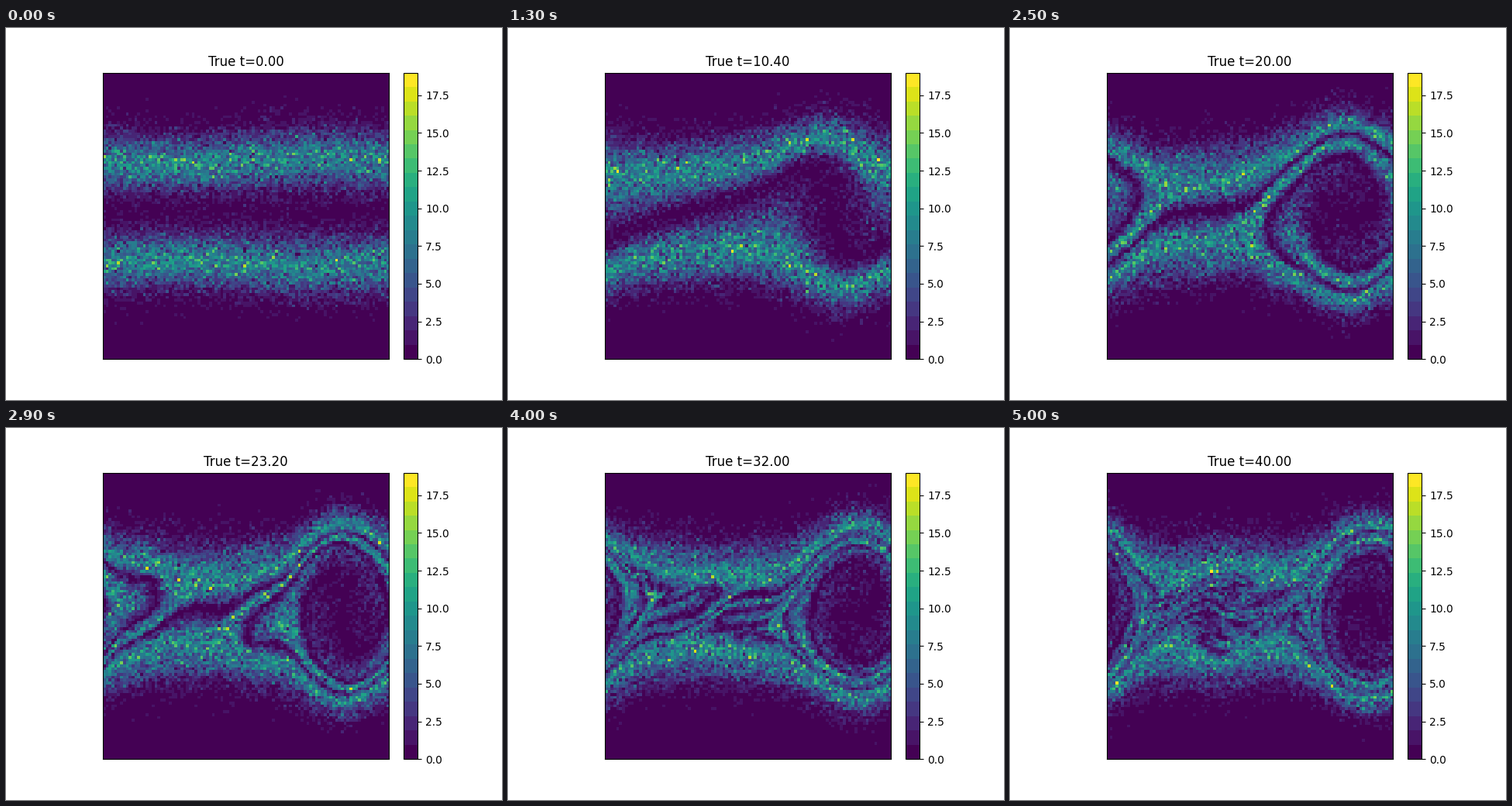
Write a matplotlib script that moves like this. It is 640 by 480 pixels and loops after 5100 ms.

```python
import numpy as np
import matplotlib.pyplot as plt
from matplotlib.animation import FuncAnimation

# Two-stream instability: electrostatic particle-in-cell run in 1D
FRAMES, FRAME_DT, SUBSTEPS = 51, 0.8, 4
LENGTH, GRID, COUNT = 50.0, 400, 25000
BEAM, DRIFT, SPREAD, KICK = 3.0, 0.22, 1.0, 0.06
V_MAX, BINS, TOP = 8.48, 100, 19

rng = np.random.default_rng(4)
wavenumber = 2 * np.pi * np.fft.rfftfreq(GRID, LENGTH / GRID)


def start():
    half = COUNT // 2
    slots = np.arange(half)
    x = np.concatenate([(slots + rng.random(half)) * LENGTH / half for _ in range(2)])
    v = rng.normal(0, SPREAD, COUNT)
    v += np.where(np.arange(COUNT) < half, BEAM, -BEAM)
    v *= 1 - KICK * np.sin(2 * np.pi * x / LENGTH)
    return x % LENGTH, v + DRIFT


def acceleration(x):
    cell = x * GRID / LENGTH
    left = cell.astype(int)
    frac = cell - left
    left %= GRID
    right = (left + 1) % GRID
    density = np.bincount(left, 1 - frac, GRID) + np.bincount(right, frac, GRID)
    modes = np.fft.rfft(density * GRID / COUNT)
    modes[0] = 0
    modes[1:] /= 1j * wavenumber[1:]
    field = np.fft.irfft(modes, GRID)
    return field[left] * (1 - frac) + field[right] * frac


def phase_space(x, v):
    box = [[0, LENGTH], [-V_MAX, V_MAX]]
    return np.histogram2d(x, v, bins=BINS, range=box)[0].T


def simulate():
    x, v = start()
    dt = FRAME_DT / SUBSTEPS
    acc = acceleration(x)
    history = [phase_space(x, v)]
    for _ in range(FRAMES - 1):
        for _ in range(SUBSTEPS):
            v += acc * dt / 2
            x = (x + v * dt) % LENGTH
            acc = acceleration(x)
            v += acc * dt / 2
        history.append(phase_space(x, v))
    return history


history = simulate()

fig = plt.figure(figsize=(6.4, 4.8), dpi=100)
side = 0.77 * 480
left_edge = 328 - 0.55 * side
ax = fig.add_axes([left_edge / 640, 0.11, side / 640, 0.77])
bar_ax = fig.add_axes([(left_edge + 1.05 * side) / 640, 0.11, 0.05 * side / 640, 0.77])

image = ax.imshow(history[0], origin="lower", interpolation="nearest",
                  cmap=plt.get_cmap("viridis", TOP + 1), vmin=0, vmax=TOP)
ax.set_xticks([])
ax.set_yticks([])
title = ax.set_title("True t=0.00")
fig.colorbar(image, cax=bar_ax)


def update(i):
    image.set_data(history[i])
    title.set_text(f"True t={i * FRAME_DT:.2f}")
    return image, title


anim = FuncAnimation(fig, update, frames=FRAMES, interval=100, repeat=True,
                     repeat_delay=0, blit=False)
plt.show()
```
